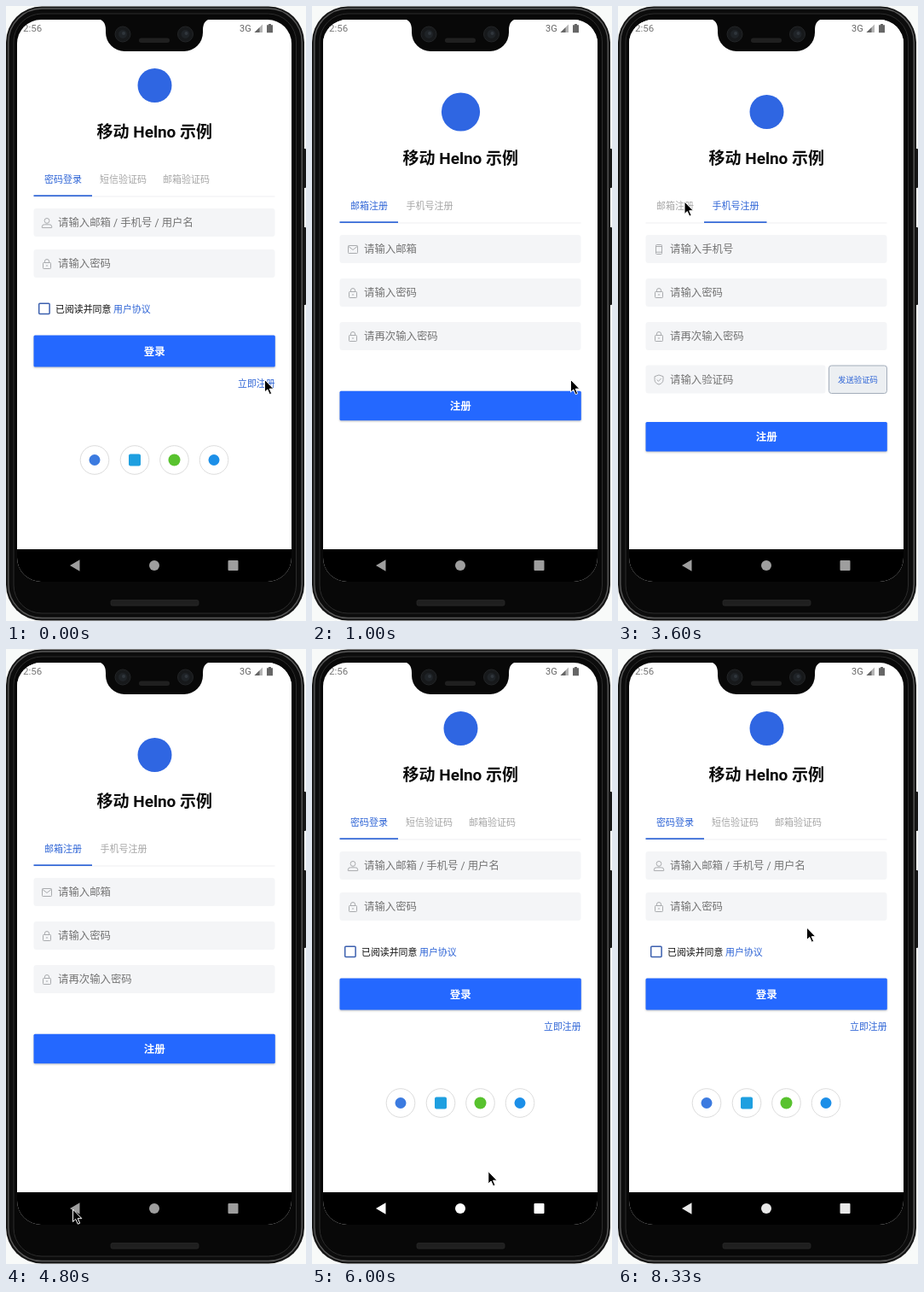
An HTML page that plays this animation: 352x720 px, repeating every 8.47 s.

```html
<!DOCTYPE html>
<html lang="zh-CN">
<head>
<meta charset="utf-8">
<title>移动登录示例</title>
<style>
html, body { margin: 0; width: 100%; height: 100%; overflow: hidden; background: #f8faf9; }
svg { display: block; }
text { font-family: Roboto, "Noto Sans CJK SC", "Noto Sans CJK", sans-serif; }
</style>
</head>
<body>
<svg id="stage" width="352" height="720" viewBox="0 0 352 720"></svg>
<script>
const LOOP = 8470;
const BLUE = '#2468ff', LINK = '#2f65d6', GREY = '#a6a6a6', HINT = '#747474';

const text = (x, cy, size, fill, str, extra = '') =>
  `<text x="${x}" y="${cy + size * 0.38}" font-size="${size}" fill="${fill}" ${extra}>${str}</text>`;
const mid = (x, cy, size, fill, str, weight = 400) =>
  text(x, cy, size, fill, str, `text-anchor="middle" font-weight="${weight}"`);
const box = (x, y, w, h, r, fill, extra = '') =>
  `<rect x="${x}" y="${y}" width="${w}" height="${h}" rx="${r}" fill="${fill}" ${extra}/>`;
const disc = (x, y, r, fill, extra = '') =>
  `<circle cx="${x}" cy="${y}" r="${r}" fill="${fill}" ${extra}/>`;

// Field icons, centred on 0,0
const icons = {
  user: '<circle cy="-2.6" r="2.9"/><path d="M-5.7 5.6v-1.4q0-2.4 3-2.4h5.4q3 0 3 2.4v1.4z"/>',
  lock: '<rect x="-4.5" y="-1.5" width="9" height="7" rx=".8"/><path d="M-2.6-1.5v-1.4a2.6 2.6 0 0 1 5.2 0v1.4M0 1v2"/>',
  mail: '<rect x="-5.5" y="-4.5" width="11" height="9" rx=".8"/><path d="M-5-3.5L0 .5 5-3.5"/>',
  phone: '<rect x="-3.5" y="-5.5" width="7" height="11" rx="1"/><path d="M-3.5-3.5h7M-3.5 3.2h7"/>',
  check: '<path d="M0-5.5L5-3.8V0q0 4-5 5.6Q-5 4-5 0v-3.8zM-2.4 0l1.9 1.8L2.6-1.5"/>'
};
const field = (y, icon, hint, w = 283) => box(32.5, y, w, 33, 3, '#f4f5f7') +
  `<g transform="translate(48 ${y + 17})" fill="none" stroke="#a9abae">${icons[icon]}</g>` +
  text(61, y + 16.5, 12.4, HINT, hint);
const button = (y, h, label) =>
  box(32.5, y, 283.3, h, 1.5, BLUE, 'filter="url(#soft)"') + mid(174.3, y + h / 2, 12.5, '#fff', label, 700);
const header = y =>
  disc(174.5, y, 20, '#2f66e2', 'class="logo"') + mid(174.3, y + 54, 19, '#0b0b0b', '移动 Helno 示例', 700);
const divider = y => box(32.5, y, 283, 1, 0, '#eff0f1');
const badge = (x, mark) => disc(x, 531.5, 16.8, '#fff', 'stroke="#dcdcdc"') + mark;

const login = header(93) +
  text(45, 203, 11, LINK, '密码登录', 'font-weight="500"') +
  text(110, 203, 11, GREY, '短信验证码') + text(184, 203, 11, GREY, '邮箱验证码') +
  divider(222.5) + box(32.5, 221.3, 68.5, 1.7, 0, LINK) +
  field(237, 'user', '请输入邮箱 / 手机号 / 用户名') + field(285, 'lock', '请输入密码') +
  box(38.7, 348.2, 12.4, 12.4, 1, '#fff', 'stroke="#3b5fae" stroke-width="1.5"') +
  text(58, 354.5, 10.9, '#111', '已阅读并同意') + text(126, 354.5, 10.9, LINK, '用户协议') +
  button(385.5, 37, '登录') + text(272, 441.5, 10.9, LINK, '立即注册') +
  badge(104, disc(104, 531.5, 6.5, '#3c7be0')) +
  badge(151, box(144, 524.5, 14, 14, 2, '#1e9fe0')) +
  badge(197.5, disc(197.5, 531.5, 7, '#58c22e')) +
  badge(244, disc(244, 531.5, 6.5, '#1c8fe8'));

const passwords = field(319, 'lock', '请输入密码') + field(370, 'lock', '请再次输入密码');
const register = box(13, 16, 322, 620, 0, '#fff') + header(124) +
  text(45, 234, 11, LINK, '邮箱注册', 'id="tabMail"') + text(110.5, 234, 11, GREY, '手机号注册', 'id="tabPhone"') +
  divider(253.5) + box(32.5, 252.3, 68.5, 1.7, 0, LINK, 'id="bar"') + passwords +
  `<g id="byMail">${field(268, 'mail', '请输入邮箱')}${button(450.7, 34.6, '注册')}</g>` +
  `<g id="byPhone">${field(268, 'phone', '请输入手机号')}${field(420.5, 'check', '请输入验证码', 211)}` +
  box(247.5, 421, 68, 32.5, 3, '#eceff2', 'stroke="#a3adba"') + mid(281.5, 437.5, 9.4, LINK, '发送验证码') +
  button(487, 34.6, '注册') + '</g>';

const status = text(20, 26, 11.5, '#777', '2:56') + text(274, 26, 11, '#666', '3G') +
  '<path d="M301 21.5v9.5h-9.5z" fill="#b5b5b5"/><path d="M297.5 25v6h-6z" fill="#666"/>' +
  '<path d="M306 22.3h2v-1.3h3v1.3h2v9h-7z" fill="#666"/>';

const lens = x => disc(x, 33, 9, '#17191b', 'stroke="#232527"') + disc(x, 33, 5, '#1f2327') + disc(x + 1, 32, 2, '#30363c');
const body = box(348, 167, 4, 46, 1, '#161616') + box(348, 259, 4, 91, 1, '#161616') +
  box(0, .5, 350, 719, 42, '#151515') +
  box(2.8, 3, 344.4, 713.5, 39.5, '#0c0c0c', 'stroke="#585858" stroke-width="1.4"') +
  box(9, 9, 331.5, 702, 33, '#080808', 'stroke="#2c2c2c"') +
  box(123, 695.5, 103, 6.5, 2, '#1f1f1f', 'stroke="#292929" stroke-width=".8"');
const notch = '<path d="M105 15q12 0 12 13v3a22 22 0 0 0 22 22h70a22 22 0 0 0 22-22v-3q0-13 12-13z" fill="#080808"/>' +
  lens(137) + lens(210.5) + box(156, 37.5, 36, 5.5, 2.7, '#202020');

const $ = id => document.getElementById(id);
$('stage').innerHTML = `<defs>
  <clipPath id="screen"><rect x="13" y="16" width="322" height="658" rx="28"/></clipPath>
  <filter id="soft" x="-5%" y="-20%" width="110%" height="150%" color-interpolation-filters="sRGB">
    <feDropShadow dx="0" dy="1" stdDeviation=".9" flood-color="#000" flood-opacity=".25"/></filter></defs>
  ${body}<g clip-path="url(#screen)">${box(13, 16, 322, 658, 0, '#fff')}${login}
  <g id="register">${register}</g>${status}${box(13, 636, 322, 38, 0, '#000')}</g>
  <g id="nav"><path d="M75 655l11.5-6.7v13.4z"/><circle cx="174" cy="655" r="6"/><rect x="260.5" y="649" width="12" height="12" rx="1"/></g>
  ${notch}
  <circle id="ring" r="22.3" fill="none" stroke="#111" stroke-width="1.6"/>
  <path id="cursor" d="M0 0v14.6l3.3-3.1 2.5 5.7 2.4-1-2.5-5.5h4.7z" fill="#000" stroke="#fff" stroke-width="1"/>`;

// Cursor path: time, x, y
const path = [
  [0, 303.5, 437.5], [1000, 303.5, 437.5], [1500, 151, 231], [1600, 154, 230], [1900, 133, 230], [2100, 137, 230],
  [2800, 137, 230], [3300, 82, 230], [3400, 78, 229], [3900, 78, 229], [4100, 157, 622], [4300, 157, 623],
  [4600, 76, 661], [4800, 78.5, 656], [5600, 78.5, 656], [6000, 206.8, 611.5], [6200, 206.8, 611.5],
  [6400, 277, 683], [6600, 277, 683], [6700, 279, 688], [7100, 279, 688]
];
const clicks = [[700, 800], [2500, 2700], [3700, 3900], [5400, 5600]];

const ramp = (t, from, to) => Math.min(1, Math.max(0, (t - from) / (to - from)));
const ease = p => p * (2 - p);
const within = (t, from, to) => t >= from && t < to;
const set = (el, attrs) => { for (const k in attrs) el.setAttribute(k, attrs[k]); };
const show = (id, on) => set($(id), { visibility: on ? 'inherit' : 'hidden' });

function cursorAt(t) {
  if (t >= 8330) return [221.5, 326];
  if (t >= 7900) return [221, 452];
  const i = path.findIndex(p => p[0] > t);
  if (i < 0) return path[path.length - 1].slice(1);
  const a = path[i - 1], b = path[i], p = ramp(t, a[0], b[0]);
  return [a[1] + (b[1] - a[1]) * p, a[2] + (b[2] - a[2]) * p];
}

const logo = document.querySelector('#register .logo');

function draw(now) {
  const raw = now % LOOP;
  const t = raw >= 8330 ? 8330 : Math.floor(raw / 100) * 100;

  const page = ease(ramp(t, 700, 1000)) - ease(ramp(t, 5500, 5900));
  set($('register'), { opacity: page, transform: `translate(0 ${(1 - page) * 50})` });
  set(logo, { r: 20 + 2.6 * (1 - ramp(t, 1000, 1400)) });

  const slide = ease(ramp(t, 2700, 3000)) - ease(ramp(t, 3800, 4100));
  const onPhone = within(t, 2700, 3800);
  set($('bar'), { x: 32.5 + 68.5 * slide, width: 68.5 + 5 * slide });
  set($('tabMail'), { fill: onPhone ? GREY : LINK });
  set($('tabPhone'), { fill: onPhone ? LINK : GREY });
  show('byMail', !onPhone);
  show('byPhone', onPhone);

  const tone = t >= 8330 ? 232 : Math.round(158 + 97 * ramp(t, 5500, 5900));
  set($('nav'), { fill: `rgb(${tone},${tone},${tone})` });

  const [x, y] = cursorAt(t);
  set($('cursor'), { transform: `translate(${x} ${y})` });
  set($('ring'), { cx: x - .5, cy: y + .5 });
  show('cursor', !within(t, 7100, 7900));
  show('ring', clicks.some(c => within(t, ...c)));
}

const start = performance.now();
function tick() {
  draw(performance.now() - start);
  requestAnimationFrame(tick);
}
tick();
</script>
</body>
</html>
```
